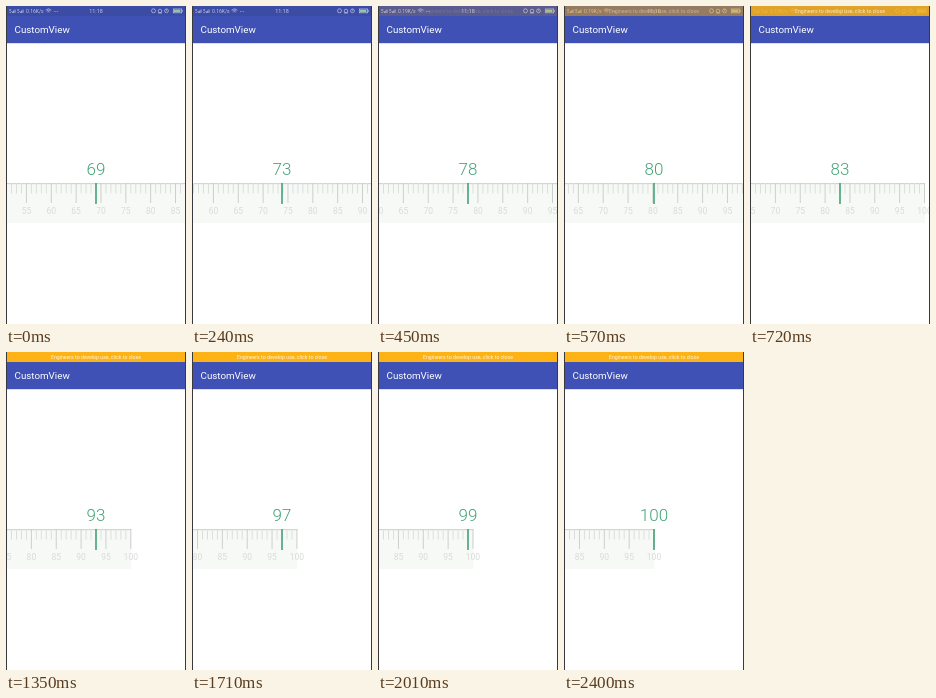
An HTML page with a canvas for the animation above (2.43 s loop, 180 by 318 pixels).

```html
<!DOCTYPE html>
<html lang="en">
<head>
<meta charset="utf-8">
<title>Ruler picker</title>
<style>
html, body { margin: 0; width: 100%; height: 100%; overflow: hidden; background: #fff; }
canvas { display: block; width: 180px; height: 318px; }
</style>
</head>
<body>
<canvas id="stage"></canvas>
<script>
const W = 180, H = 318, LOOP = 2430, TICK = 30;
const UNIT = 4.97, CENTER = 90, MAX = 100, RULER_TOP = 177;
const GREEN = '#42a377';
const FONT = 'Roboto, "Noto Sans", sans-serif';

// Scroll keys: [ms, ruler value]
const KEYS = [[0, 69], [450, 78], [720, 83], [870, 86], [1050, 89],
  [1350, 93], [1620, 96], [1710, 97], [1860, 98], [2010, 99], [2400, 100]];
// Late in the scroll the picture only updates at these moments
const UPDATES = [1050, 1140, 1170, 1200, 1260, 1290, 1350, 1440, 1500, 1560,
  1620, 1710, 1860, 2010, 2400];

const canvas = document.getElementById('stage');
const ctx = canvas.getContext('2d');
const ratio = window.devicePixelRatio || 1;
canvas.width = W * ratio;
canvas.height = H * ratio;
ctx.scale(ratio, ratio);

const clamp = v => Math.max(0, Math.min(1, v));

function rect(x, y, w, h, color) {
  ctx.fillStyle = color;
  ctx.fillRect(x, y, w, h);
}

function text(str, x, y, size, color, align = 'center', weight = 400) {
  ctx.font = `${weight} ${size}px ${FONT}`;
  ctx.textAlign = align;
  ctx.fillStyle = color;
  ctx.fillText(str, x, y);
}

function heldTime(t) {
  if (t < UPDATES[0]) return Math.floor(t / TICK) * TICK;
  return UPDATES.filter(u => u <= t).pop();
}

function valueAt(t) {
  const i = KEYS.findIndex(k => k[0] > t);
  if (i < 0) return MAX;
  const [t0, v0] = KEYS[i - 1], [t1, v1] = KEYS[i];
  return v0 + (v1 - v0) * (t - t0) / (t1 - t0);
}

function ring(x, y, r, from = 0, to = Math.PI * 2) {
  ctx.beginPath();
  ctx.arc(x, y, r, from, to);
  ctx.stroke();
}

function signal(x, color) {
  text('5', x, 6.8, 4.5, color, 'left');
  for (let i = 0; i < 3; i++) rect(x + 3 + i * 1.3, 5.5 - i, 0.8, 1.4 + i, color);
}

function phoneStatus(t) {
  const ink = '#c3c9e6';
  rect(0, 0, W, 10, '#3c4ba4');
  signal(3, ink);
  signal(11, ink);
  text(t < 300 ? '0.16K/s' : '0.19K/s', 20, 6.8, 5, ink, 'left');
  ctx.strokeStyle = ink;
  ctx.lineWidth = 0.7;
  for (const r of [1.2, 2.6, 4]) ring(42.5, 7, r, -Math.PI * 0.75, -Math.PI * 0.25);
  text('•••', 48, 6.8, 4, ink, 'left');
  text('11:18', 90, 7, 5.4, ink);
  ring(147.5, 4.8, 2);
  ring(154, 5, 1.8);
  rect(152, 6.6, 4, 0.7, ink);
  ring(160.5, 4.8, 1.9);
  rect(160.2, 3.4, 0.6, 1.7, ink);
  ctx.strokeRect(167.3, 3, 8.4, 3.8);
  rect(168, 3.7, 6.4, 2.4, '#8fc9a0');
  rect(176.2, 4.2, 0.8, 1.4, ink);
}

function statusBar(t) {
  const fade = clamp((t - 390) / 390);
  if (fade < 1) phoneStatus(t);
  ctx.globalAlpha = fade;
  rect(0, 0, W, 10, '#fdb316');
  text('Engineers to develop use, click to close', 90, 7, 5.2, '#fff6df');
  ctx.globalAlpha = 1;
}

function ruler(value) {
  const toX = n => CENTER + (n - value) * UNIT;
  const end = Math.min(W, toX(MAX) + 0.5);
  rect(0, RULER_TOP, end, 40, '#f7f9f7');
  rect(0, RULER_TOP, end, 1.2, '#d0d5d1');
  for (let n = Math.floor(value) - 22; n <= MAX; n++) {
    const x = toX(n);
    if (x > W + 10) break;
    const major = n % 5 === 0;
    rect(x - 0.5, RULER_TOP, 1, major ? 20 : 10.5, major ? '#cbd0cc' : '#dbdfdc');
    if (major) text(n, x, 208, 8.5, '#d8dbd8');
  }
  rect(CENTER - 0.8, RULER_TOP, 1.6, 21, GREEN);
  text(Math.floor(value + 0.001), CENTER, 168.6, 17, GREEN, 'center', 300);
}

function draw(t) {
  rect(0, 0, W, H, '#fff');
  statusBar(t);
  rect(0, 10, W, 27, '#3f51b5');
  rect(0, 37, W, 0.6, '#c3c8df');
  text('CustomView', 8.5, 27, 9.8, '#fff', 'left');
  ruler(valueAt(t));
  rect(0, 0, 1, H, '#3a3a3e');
  rect(W - 1, 0, 1, H, '#3a3a3e');
}

const start = performance.now();
function frame() {
  draw(heldTime((performance.now() - start) % LOOP));
  requestAnimationFrame(frame);
}
frame();
</script>
</body>
</html>
```
